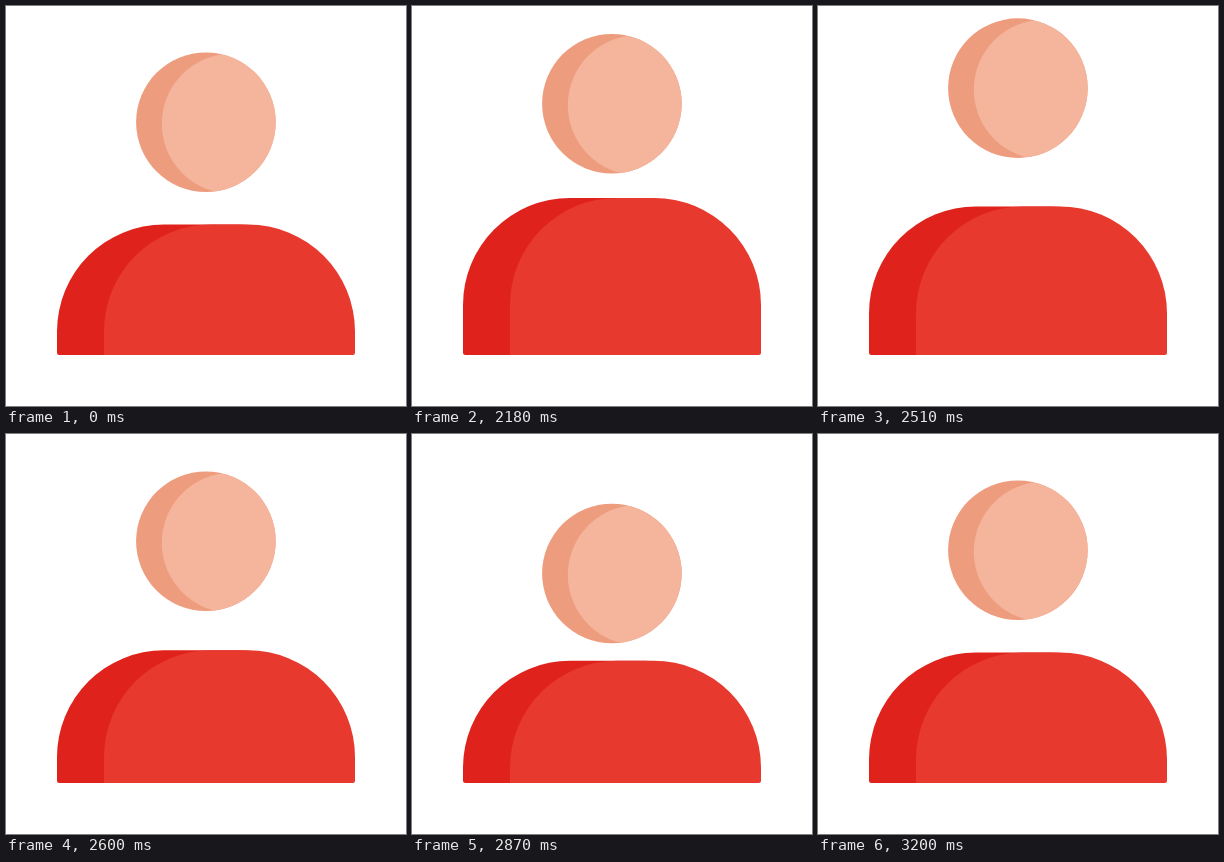
An HTML page with a canvas for the animation above (3230 ms loop, 400 by 400 pixels).

```html
<!DOCTYPE html>
<html lang="en">
<head>
<meta charset="utf-8">
<title>User icon</title>
<style>
  html, body { margin: 0; width: 100%; height: 100%; overflow: hidden; background: #fff; }
  canvas { display: block; width: 400px; height: 400px; }
</style>
</head>
<body>
<canvas id="stage" width="400" height="400"></canvas>
<script>
const ctx = document.getElementById('stage').getContext('2d');
const LOOP = 3230, REST = 2000, STEP = 30;

function bezier(x1, y1, x2, y2) {
  const at = (a, b, u) => 3 * a * u * (1 - u) ** 2 + 3 * b * u * u * (1 - u) + u ** 3;
  return x => {
    let low = 0, high = 1;
    for (let i = 0; i < 30; i++) {
      const mid = (low + high) / 2;
      if (at(x1, x2, mid) < x) low = mid; else high = mid;
    }
    return at(y1, y2, (low + high) / 2);
  };
}

const smooth = bezier(1 / 3, 0, 2 / 3, 1);

// Each key: step, value, easing towards that value.
const headKeys = [
  [0, 116.2],
  [13, 74.4, smooth],
  [25, 144.4, bezier(.68, 0, .58, 1)],
  [40, 116.2, smooth]
];
const bodyKeys = [
  [0, 218.5],
  [12, 184, bezier(.2, .52, .6, 1)],
  [25, 228.5, bezier(.33, 0, .58, 1)],
  [40, 218.5, smooth]
];

function valueAt(keys, step) {
  const i = Math.max(1, keys.findIndex(key => step <= key[0]));
  const [start, from] = keys[i - 1];
  const [end, to, ease] = keys[i];
  return from + (to - from) * ease((step - start) / (end - start));
}

function disc(x, y, radius, color) {
  ctx.fillStyle = color;
  ctx.beginPath();
  ctx.arc(x, y, radius, 0, Math.PI * 2);
  ctx.fill();
}

function drawHead(y) {
  disc(199.9, y, 69.8, '#ee9c7e');
  ctx.save();
  ctx.beginPath();
  ctx.arc(199.9, y, 69.8, 0, Math.PI * 2);
  ctx.clip();
  disc(225.8, y + 1.5, 70, '#f4b59c');
  ctx.restore();
}

function shoulders(left, right, top, color) {
  const bottom = 349, shoulder = 107, corner = 2.5;
  ctx.fillStyle = color;
  ctx.beginPath();
  ctx.moveTo(left, bottom - corner);
  ctx.arcTo(left, top, left + shoulder, top, shoulder);
  ctx.arcTo(right, top, right, top + shoulder, shoulder);
  ctx.arcTo(right, bottom, right - corner, bottom, corner);
  ctx.arcTo(left, bottom, left, bottom - corner, corner);
  ctx.closePath();
  ctx.fill();
}

function drawBody(top) {
  shoulders(51, 340, top, '#df221c');
  shoulders(98, 349, top, '#e8392f');
  ctx.fillStyle = '#df221c';
  ctx.fillRect(90, 345, 8, 4);
  ctx.fillStyle = '#e8392f';
  ctx.fillRect(98, 345, 8, 4);
}

function draw(now) {
  const step = Math.max(0, Math.floor((now % LOOP - REST) / STEP));
  ctx.fillStyle = '#fff';
  ctx.fillRect(0, 0, 400, 400);
  drawHead(valueAt(headKeys, step));
  drawBody(valueAt(bodyKeys, step));
}

const begin = performance.now();
function tick() {
  draw(performance.now() - begin);
  requestAnimationFrame(tick);
}
tick();
</script>
</body>
</html>
```
